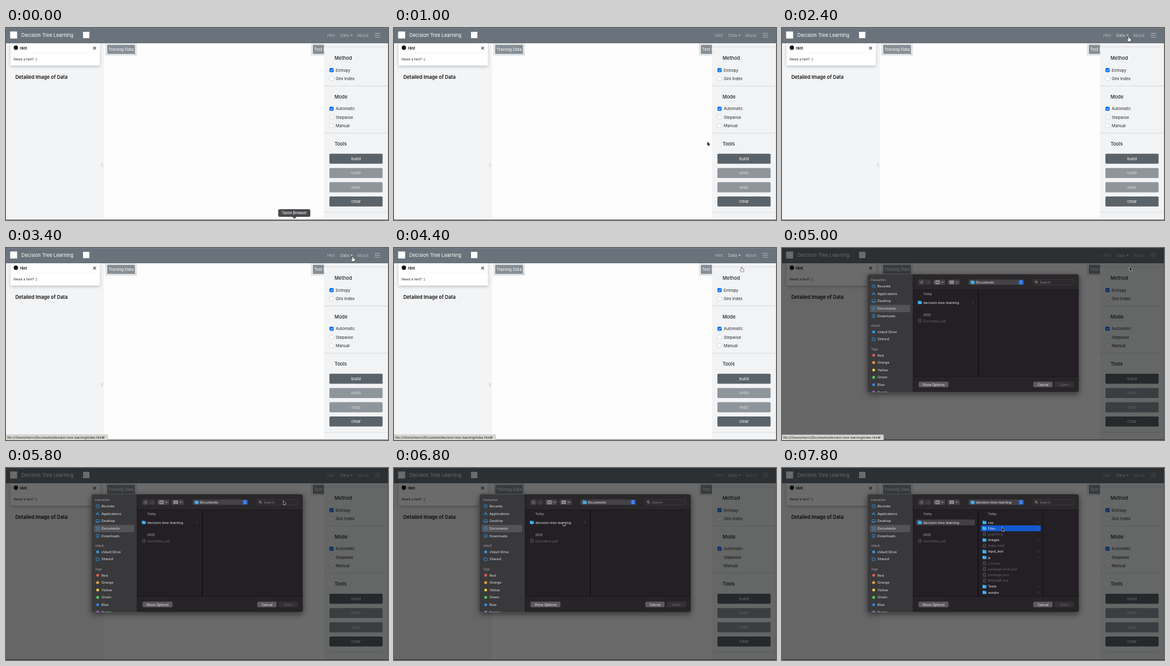
An HTML page with a canvas for the animation above (8000 ms loop, 600 by 302 pixels).

```html
<!DOCTYPE html>
<html lang="en">
<head>
<meta charset="utf-8">
<title>Decision Tree Learning</title>
<style>
html, body { margin: 0; width: 100%; height: 100%; overflow: hidden; background: #fdfdfd; }
canvas { display: block; width: 100vw; height: 100vh; }
</style>
</head>
<body>
<canvas id="stage"></canvas>
<script>
const W = 600, H = 302, LOOP = 8000, STEP = 200;
const canvas = document.getElementById('stage');
const ctx = canvas.getContext('2d');
const BLUE = '#2b9df4', FOLDER = '#45b4f0';

function rect(x, y, w, h, fill, r = 0) {
  ctx.fillStyle = fill;
  ctx.beginPath();
  ctx.roundRect(x, y, w, h, r);
  ctx.fill();
}

function frame(x, y, w, h, color, r = 0, width = 0.5) {
  ctx.strokeStyle = color;
  ctx.lineWidth = width;
  ctx.beginPath();
  ctx.roundRect(x, y, w, h, r);
  ctx.stroke();
}

function line(points, color, width = 0.6) {
  ctx.strokeStyle = color;
  ctx.lineWidth = width;
  ctx.beginPath();
  points.forEach(([x, y], i) => i ? ctx.lineTo(x, y) : ctx.moveTo(x, y));
  ctx.stroke();
}

function dot(x, y, r, fill) {
  ctx.fillStyle = fill;
  ctx.beginPath();
  ctx.arc(x, y, r, 0, Math.PI * 2);
  ctx.fill();
}

// y is the visual middle of the line
function text(s, x, y, size, color, weight = 400, align = 'left') {
  ctx.font = `${weight} ${size}px Inter, "Liberation Sans", sans-serif`;
  ctx.textAlign = align;
  ctx.fillStyle = color;
  ctx.fillText(s, x, y + size * 0.36);
}

function chevron(x, y, s, color, width = 0.7) {
  line([[x - s / 2, y - s], [x + s / 2, y], [x - s / 2, y + s]], color, width);
}

// ---------- page ----------

function navbar(hover) {
  rect(0, 0, W, 24, '#6a737b');
  rect(0, 0, W, 0.6, '#7d868d');
  rect(6.5, 5.5, 11, 11, '#fff');
  text('Decision Tree Learning', 24, 11.5, 7.5, '#fff');
  rect(121, 6, 10, 10, '#fff');
  const dim = '#b5babe';
  const data = hover ? '#d4d7da' : dim;
  text('Hint', 504.5, 11.5, 6.4, dim);
  text('Data', 525, 11.5, 6.3, data);
  ctx.fillStyle = data;
  ctx.beginPath();
  ctx.moveTo(540.8, 10.6);
  ctx.lineTo(544.8, 10.6);
  ctx.lineTo(542.8, 12.7);
  ctx.fill();
  text('About', 551.5, 11.5, 6.3, dim);
  for (const y of [8.5, 11.5, 14.5]) line([[579, y], [587.5, y]], dim, 0.8);
}

function toast() {
  ctx.save();
  ctx.beginPath();
  ctx.rect(0, 24, 154, 60);
  ctx.clip();
  ctx.shadowColor = 'rgba(0,0,0,.2)';
  ctx.shadowBlur = 5;
  ctx.shadowOffsetY = 2;
  rect(7, 22, 140.5, 37, '#fff', 1.5);
  ctx.restore();
  line([[7, 39.5], [147.5, 39.5]], '#ececed', 0.5);
  dot(15.5, 31, 3.4, '#111');
  text('Hint', 22, 31.7, 5.5, '#222', 700);
  line([[137, 29.5], [141.4, 33.9]], '#555', 1.1);
  line([[141.4, 29.5], [137, 33.9]], '#555', 1.1);
  text('Need a hint? :)', 12, 49.2, 5.4, '#212529');
}

function label(s, x, w) {
  rect(x, 24, w, 19, '#e9ebec');
  frame(x, 24, w, 19, '#c3c7ca');
  rect(x + 2.5, 26.5, w - 5, 14.3, '#868e95');
  line([[x + w - 3, 42.5], [x + w - 0.5, 40]], '#777', 0.5);
  text(s, x + 4.5, 33.7, 6.3, '#fff');
}

function checkbox(s, y, on) {
  if (on) {
    rect(508, y - 3.3, 6.6, 6.6, '#0d6ff2', 1.5);
    line([[509.6, y + 0.1], [510.9, y + 1.4], [513.1, y - 1.3]], '#fff', 0.9);
  } else {
    rect(508, y - 3.3, 6.6, 6.6, '#fff', 1.5);
    frame(508.25, y - 3.05, 6.1, 6.1, '#b4b8bc', 1.4);
  }
  text(s, 518, y + 0.2, 6.3, '#24282c');
}

function sidePanel() {
  rect(499.5, 24, 100.5, 278, '#f2f3f5');
  for (const y of [29.7, 91.3, 165.5, 290]) line([[499.5, y], [599, y]], '#d5d7d9', 0.8);
  const heads = [['Method', 47.8], ['Mode', 108.5], ['Tools', 182.5]];
  for (const [s, y] of heads) text(s, 516, y, 7.45, '#212529', 500);
  checkbox('Entropy', 66.3, true);
  checkbox('Gini Index', 79.7, false);
  checkbox('Automatic', 127, true);
  checkbox('Stepwise', 140.3, false);
  checkbox('Manual', 153.7, false);
  ['build', 'undo', 'redo', 'clear'].forEach((s, i) => {
    const off = i === 1 || i === 2;
    const y = 197.7 + i * 22.45;
    rect(508, y, 83.5, 15.8, off ? '#8e959b' : '#5a636a', 1.5);
    text(s, 549.7, y + 7.9, 6.4, off ? '#d9dcde' : '#fff', 400, 'center');
  });
  line([[599.6, 24], [599.6, H]], '#dcdddf', 0.8);
}

function page(hover) {
  rect(0, 0, W, H, '#fdfdfd');
  rect(0, 24, 154, 278, '#f3f4f6');
  toast();
  text('Detailed Image of Data', 14.7, 77.5, 7.5, '#111', 600);
  for (const x of [150, 151.2]) line([[x, 212], [x, 218.5]], '#bbb', 0.5);
  label('Training Data', 156.5, 48.5);
  label('Test Data', 479.5, 40);
  sidePanel();
  navbar(hover);
  rect(0, 301, W, 1, '#858789');
}

function dockTip() {
  rect(427.5, 285, 50.5, 12, '#48494b', 2.5);
  ctx.beginPath();
  ctx.moveTo(449.5, 296.8);
  ctx.lineTo(456.5, 296.8);
  ctx.lineTo(453, 300.3);
  ctx.fill();
  text('Tavon Browser', 452.8, 291, 5.5, '#f2f2f2', 500, 'center');
}

function statusBar() {
  rect(0, 293.8, 159.5, 8.2, '#d8d8d2');
  frame(-1, 293.8, 160.5, 9, '#b5b4a4', 1);
  text('file:///Users/merro/Documents/decision-tree-learning/index.html#', 2, 298.3, 4.9, '#1c1c1c');
}

// ---------- file dialog, laid out at its resting place ----------

function folder(x, y) {
  rect(x - 3, y - 2.6, 3, 2, FOLDER, 0.6);
  rect(x - 3, y - 2, 6, 4.8, FOLDER, 0.7);
  line([[x - 3, y - 0.8], [x + 3, y - 0.8]], '#2589c4', 0.4);
}

function sheet(x, y, color) {
  frame(x - 1.8, y - 2.5, 3.6, 5, color, 0.4, 0.7);
  line([[x - 0.8, y], [x + 0.8, y]], color, 0.5);
}

const sideIcons = {
  Recents(x, y) {
    ctx.strokeStyle = BLUE;
    ctx.lineWidth = 0.7;
    ctx.beginPath();
    ctx.arc(x, y, 2.6, 0, 7);
    ctx.stroke();
    line([[x, y - 1.6], [x, y], [x + 1.2, y]], BLUE);
  },
  Applications(x, y) {
    line([[x - 2.4, y + 2.4], [x, y - 2.6], [x + 2.4, y + 2.4]], BLUE, 0.7);
    line([[x - 2.8, y + 0.8], [x + 2.8, y + 0.8]], BLUE, 0.7);
  },
  Desktop(x, y) {
    frame(x - 2.8, y - 2.1, 5.6, 4.2, BLUE, 0.7, 0.7);
    line([[x - 2.5, y + 1.3], [x + 2.5, y + 1.3]], BLUE, 0.8);
  },
  Documents(x, y) { sheet(x, y, BLUE); },
  Downloads(x, y) {
    sideIcons.ring(x, y);
    line([[x, y - 1.5], [x, y + 1.4]], BLUE);
    line([[x - 1, y + 0.4], [x, y + 1.4], [x + 1, y + 0.4]], BLUE);
  },
  ring(x, y) { frame(x - 2.6, y - 2.6, 5.2, 5.2, BLUE, 2.6, 0.7); },
  'oVault Drive'(x, y) { dot(x, y, 2.3, BLUE); },
  Shared(x, y) {
    frame(x - 2.6, y - 1.6, 5.2, 3.8, BLUE, 0.6, 0.7);
    line([[x - 2.6, y - 2.4], [x - 0.3, y - 2.4]], BLUE, 0.8);
  }
};

function sidebar() {
  rect(134, 41, 72, 186, '#39393c');
  const heads = [['Favourites', 50.4], ['oVault', 122.6], ['Tags', 159.3]];
  for (const [s, y] of heads) text(s, 140, y, 4.5, '#8d8d90', 600);
  rect(138, 89.5, 63.5, 11.6, '#545457', 2);
  const places = [['Recents', 60.2], ['Applications', 71.8], ['Desktop', 83.4], ['Documents', 95.2],
    ['Downloads', 106.8], ['oVault Drive', 132], ['Shared', 143.5]];
  for (const [s, y] of places) {
    sideIcons[s](144, y);
    text(s, 150, y, 5.35, '#e4e4e5');
  }
  const tags = [['Red', '#ef5a4c'], ['Orange', '#f3a03a'], ['Yellow', '#f5d23c'],
    ['Green', '#54cf5b'], ['Blue', '#2f8ff5'], ['Purple', '#b565d8']];
  tags.forEach(([s, color], i) => {
    const y = 168.7 + i * 11.6;
    dot(144, y, 2.2, color);
    text(s, 150, y, 5.35, '#e4e4e5');
  });
}

function toolbar(title) {
  const btn = '#454246', ink = '#d6d5d7';
  rect(214.5, 49.6, 9.2, 8.5, btn, 1.8);
  rect(225, 49.6, 9.2, 8.5, '#3a373b', 1.8);
  chevron(219.2, 53.9, -1.8, ink);
  chevron(229.7, 53.9, 1.8, '#6d6b6e');
  for (const x of [237.5, 260]) {
    rect(x, 49.6, 19, 8.5, btn, 1.8);
    line([[x + 13, 53], [x + 14.5, 54.6], [x + 16, 53]], ink, 0.7);
  }
  frame(241, 51.6, 6.4, 4.6, ink, 0.5, 0.7);
  for (const x of [243.1, 245.3]) line([[x, 51.6], [x, 56.2]], ink, 0.6);
  for (const y of [51.6, 54.4]) for (const x of [263.4, 265.7, 268]) rect(x, y, 1.6, 1.8, ink);
  rect(293, 49.6, 87, 8.5, btn, 1.8);
  folder(299.5, 53.8);
  text(title, 304.5, 53.9, 5.3, '#eeedee');
  rect(371.7, 50.2, 7.3, 7.3, '#1f67d6', 1.6);
  line([[373.9, 53.1], [375.35, 51.6], [376.8, 53.1]], '#fff', 0.7);
  line([[373.9, 54.6], [375.35, 56.1], [376.8, 54.6]], '#fff', 0.7);
  rect(394.5, 49.6, 64, 8.5, '#2c292d', 1.8);
  frame(394.5, 49.6, 64, 8.5, '#4b484c', 1.8, 0.5);
  frame(397.7, 51.7, 3.2, 3.2, '#c9c8ca', 1.6, 0.7);
  line([[400.5, 54.6], [402, 56.1]], '#c9c8ca', 0.7);
  text('Search', 404.5, 53.9, 5.3, '#8a888b');
}

function fileRow(s, x, y, isFolder) {
  if (isFolder) folder(x, y - 0.1);
  else sheet(x, y, '#747276');
  text(s, x + 5.5, y, 5.3, isFolder ? '#ecebed' : '#69666b');
}

function listing(picked) {
  const entries = ['css/', 'Files/', 'gulpfile.js', 'images/', 'index.html', 'input_text/', 'js/', 'License',
    'package-lock.json', 'package.json', 'README.md', 'Tests/', 'vendor/'];
  text('Today', 323.5, 72.7, 4.5, '#98969a', 600);
  if (picked) rect(312.3, 90.3, 94.2, 9.2, '#1259d0', 1.5);
  entries.forEach((name, i) => {
    const y = 85.6 + i * 9.17, dir = name.endsWith('/');
    fileRow(name.replace('/', ''), 318, y, dir);
    if (dir) chevron(402.7, y, 1.3, '#8d8b8f', 0.5);
  });
  line([[410, 66], [410, 202]], '#141115', 0.7);
}

function button(s, x, w, on) {
  rect(x, 210.3, w, 8.8, on ? '#5d5a5e' : '#343135', 1.8);
  text(s, x + w / 2, 214.7, 5.3, on ? '#f0eff0' : '#6f6c70', 400, 'center');
}

function dialog(dy, opened, picked) {
  ctx.save();
  ctx.translate(0, dy);
  ctx.shadowColor = 'rgba(0,0,0,.5)';
  ctx.shadowBlur = 10;
  ctx.shadowOffsetY = 3;
  rect(134, 41, 332.5, 186, '#231f24', 4);
  ctx.shadowColor = 'transparent';
  ctx.save();
  ctx.beginPath();
  ctx.roundRect(134, 41, 332.5, 186, 4);
  ctx.clip();
  rect(206, 41, 261, 25, '#2a272b');
  rect(206, 202, 261, 25, '#272428');
  sidebar();
  toolbar(opened ? 'decision-tree-learning' : 'Documents');
  line([[206, 41], [206, 227]], '#131114', 0.7);
  line([[206, 66], [467, 66]], '#161317', 0.7);
  line([[206, 202], [467, 202]], '#161317', 0.7);
  line([[308.3, 66], [308.3, 202]], '#0e0b0f', 1);
  text('Today', 222, 72.7, 4.5, '#98969a', 600);
  if (opened) rect(210.5, 81, 92.5, 9.2, picked ? '#423f44' : '#1259d0', 1.5);
  fileRow('decision-tree-learning', 216.5, 85.6, true);
  chevron(300, 85.6, 1.3, '#8d8b8f', 0.5);
  text('2022', 222, 105.2, 4.6, '#98969a', 600);
  fileRow('Derivative.pdf', 216.5, 114.6, false);
  if (opened) listing(picked);
  button('Show Options', 214.5, 47, true);
  button('Cancel', 394.7, 30.3, true);
  button('Open', 428, 30.5, false);
  ctx.restore();
  frame(134, 41, 332.5, 186, '#626064', 4, 0.6);
  ctx.restore();
}

// ---------- pointer ----------

const path = [[200, 455, 297], [2000, 544.5, 14], [3600, 544.5, 14], [4400, 546, 30.5],
  [4800, 546, 30], [5200, 546, 30], [6600, 265.5, 85], [7000, 265.5, 85], [7600, 345.5, 93.5], [8000, 345.5, 93.5]];

function pointerAt(t) {
  const i = path.findIndex(k => k[0] > t);
  const [t0, x0, y0] = path[i - 1], [t1, x1, y1] = path[i];
  const u = (t - t0) / (t1 - t0), e = u * u * (3 - 2 * u);
  return [x0 + (x1 - x0) * e, y0 + (y1 - y0) * e];
}

function shape(points, fill, stroke) {
  ctx.beginPath();
  points.forEach(([x, y]) => ctx.lineTo(x, y));
  ctx.closePath();
  ctx.lineJoin = 'round';
  ctx.lineWidth = 1;
  ctx.strokeStyle = stroke;
  ctx.stroke();
  ctx.fillStyle = fill;
  ctx.fill();
  ctx.lineJoin = 'miter';
}

function pointer(t) {
  const [x, y] = pointerAt(t);
  const hand = t >= 2000 && t < 4800;
  ctx.save();
  ctx.translate(x, y);
  if (hand) {
    shape([[-0.5, 0], [0.6, 0], [0.9, 2.3], [3.4, 3], [3.4, 5.2], [2.6, 7], [-0.6, 7], [-2.4, 4.2], [-1.7, 3.6], [-0.6, 4.5]],
      '#fff', '#222');
  } else {
    shape([[0, 0], [0, 5.9], [1.4, 4.7], [2.3, 6.8], [3.2, 6.4], [2.3, 4.4], [4.2, 4.3]], '#111', '#eee');
  }
  ctx.restore();
}

// ---------- timeline ----------

function draw(t) {
  page(t >= 2000);
  if (t < 400) dockTip();
  if (t >= 4800) {
    rect(0, 0, W, H, `rgba(0,0,0,${t < 5000 ? 0.35 : 0.58})`);
    dialog(t < 5000 ? -7.3 : 0, t >= 7000, t >= 7800);
  }
  if (t >= 2600 && t < 5600) statusBar();
  if (t >= 200) pointer(t);
}

function tick(now) {
  const ratio = window.devicePixelRatio || 1;
  const w = Math.round(innerWidth * ratio), h = Math.round(innerHeight * ratio);
  if (canvas.width !== w || canvas.height !== h) {
    canvas.width = w;
    canvas.height = h;
  }
  ctx.setTransform(w / W, 0, 0, h / H, 0, 0);
  // the screen refreshes in fixed steps
  draw(Math.floor((now % LOOP) / STEP) * STEP);
  requestAnimationFrame(tick);
}
requestAnimationFrame(tick);
</script>
</body>
</html>
```
